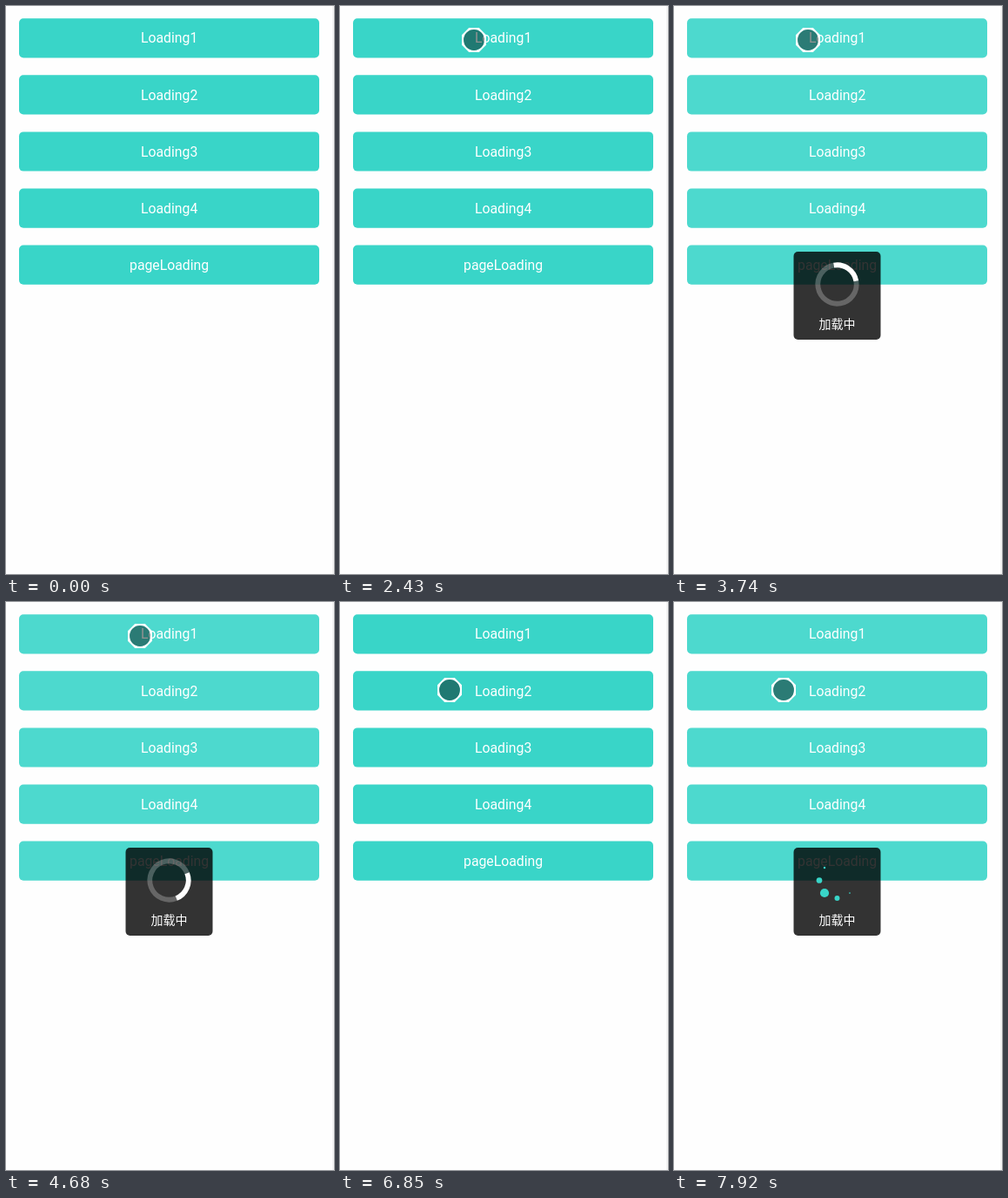
An HTML page with a canvas that plays this animation: 377 px wide and 652 px high, repeating every 8000 ms.

```html
<!DOCTYPE html>
<html lang="en">
<head>
<meta charset="utf-8">
<title>Loading demo</title>
<style>
  html, body { margin: 0; width: 100%; height: 100%; overflow: hidden; background: #fefefe; }
  canvas { display: block; width: 377px; height: 652px; }
</style>
</head>
<body>
<canvas id="stage"></canvas>
<script>
const W = 377, H = 652, LOOP = 8000;
const TEAL = '#39d5c8';
const labels = ['Loading1', 'Loading2', 'Loading3', 'Loading4', 'pageLoading'];

// The picture is repainted in even steps, counted from the pointer's arrival.
const FIRST_STEP = 1090, STEP = 133.4;
const RING_IN = 14, RING_OUT = 28, DOTS_IN = 45;

// Pointer journeys in steps; bend is the x of the curve's control point.
const home = { x: 237, y: 235 };
const moves = [
  { from: 0, to: 1, x: 197, y: 101, bend: 217 },
  { from: 4.3, to: 9.7, x: 154, y: 39, bend: 175.5 },
  { from: 34, to: 38, x: 127, y: 111, bend: 127 },
  { from: 40, to: 43, x: 126, y: 101, bend: 126.5 }
];

const canvas = document.getElementById('stage');
const ctx = canvas.getContext('2d');
const dpr = window.devicePixelRatio || 1;
canvas.width = W * dpr;
canvas.height = H * dpr;

const rad = deg => (deg - 90) * Math.PI / 180;
const smooth = u => u * u * (3 - 2 * u);
const clamp = u => Math.min(1, Math.max(0, u));

function fillRound(x, y, w, h, r, color) {
  ctx.fillStyle = color;
  ctx.beginPath();
  ctx.roundRect(x, y, w, h, r);
  ctx.fill();
}

function disc(x, y, r, color) {
  ctx.fillStyle = color;
  ctx.beginPath();
  ctx.arc(x, y, r, 0, Math.PI * 2);
  ctx.fill();
}

function centerText(text, font, x, y) {
  ctx.font = font;
  ctx.textAlign = 'center';
  ctx.fillStyle = '#fff';
  ctx.fillText(text, x, y);
}

function drawPage() {
  ctx.fillStyle = '#fefefe';
  ctx.fillRect(0, 0, W, H);
  ctx.fillStyle = '#f3f3f3';
  ctx.fillRect(375, 0, 2, H);
  labels.forEach((label, i) => {
    const y = 14.2 + i * 65.1;
    fillRound(15, y, 345, 45.2, 5, TEAL);
    centerText(label, '15.8px Roboto, "Liberation Sans", sans-serif', 187.6, y + 28.2);
  });
}

function pointerAt(step) {
  let { x, y } = home;
  for (const move of moves) {
    const s = smooth(clamp((step - move.from) / (move.to - move.from)));
    x = (1 - s) ** 2 * x + 2 * s * (1 - s) * move.bend + s * s * move.x;
    y += (move.y - y) * s;
  }
  return { x, y };
}

function drawPointer({ x, y }) {
  const r = 11.9;
  ctx.fillStyle = '#fff';
  ctx.beginPath();
  for (let i = 0; i < 8; i++) {
    const a = (i + 0.5) * Math.PI / 4;
    ctx.lineTo(x + 15.15 * Math.cos(a), y + 15.15 * Math.sin(a));
  }
  ctx.closePath();
  ctx.moveTo(x + r, y);
  ctx.arc(x, y, r, 0, Math.PI * 2);
  ctx.fill('evenodd');
  disc(x, y, r, 'rgba(0,0,0,.43)');
}

function arc(from, to, color) {
  ctx.lineWidth = 5.8;
  ctx.strokeStyle = color;
  ctx.beginPath();
  ctx.arc(0, -13, 22.2, rad(from), rad(to));
  ctx.stroke();
}

function drawRing(age) {
  const mid = 82 + age * 62.6;
  arc(mid + 45, mid + 315, 'rgba(255,255,255,.25)');
  arc(mid - 45, mid + 45, '#fff');
}

function drawDots(age) {
  const peak = 229 + (age - 6) * 48;
  for (let deg = 0; deg < 360; deg += 45) {
    const turn = (deg - peak + 720) % 360;
    const gap = Math.min(turn, 360 - turn);
    const size = 5.3 * clamp(1 - gap / 112);
    const a = rad(deg);
    disc(20.5 * Math.cos(a), -13 + 20.5 * Math.sin(a), size, TEAL);
  }
}

function drawPopup(age, spinner) {
  ctx.fillStyle = 'rgba(255,255,255,.1)';
  ctx.fillRect(0, 0, 375, H);
  ctx.save();
  ctx.translate(187.5, 332.5);
  // the first repaint catches the popup still growing
  if (age === 0) ctx.scale(0.95, 0.95);
  fillRound(-50, -50.5, 100, 101, 5, 'rgba(0,0,0,.8)');
  spinner(age);
  centerText('加载中', '14px "Noto Sans CJK SC", "Noto Sans CJK", sans-serif', 0, 37);
  ctx.restore();
}

function draw(t) {
  const step = Math.floor((t - FIRST_STEP) / STEP);
  ctx.setTransform(dpr, 0, 0, dpr, 0, 0);
  drawPage();
  if (step >= RING_IN && step < RING_OUT) drawPopup(step - RING_IN, drawRing);
  if (step >= DOTS_IN) drawPopup(step - DOTS_IN, drawDots);
  if (step >= 0) drawPointer(pointerAt(step));
}

const start = performance.now();
function loop() {
  draw((performance.now() - start) % LOOP);
  requestAnimationFrame(loop);
}
loop();
</script>
</body>
</html>
```
